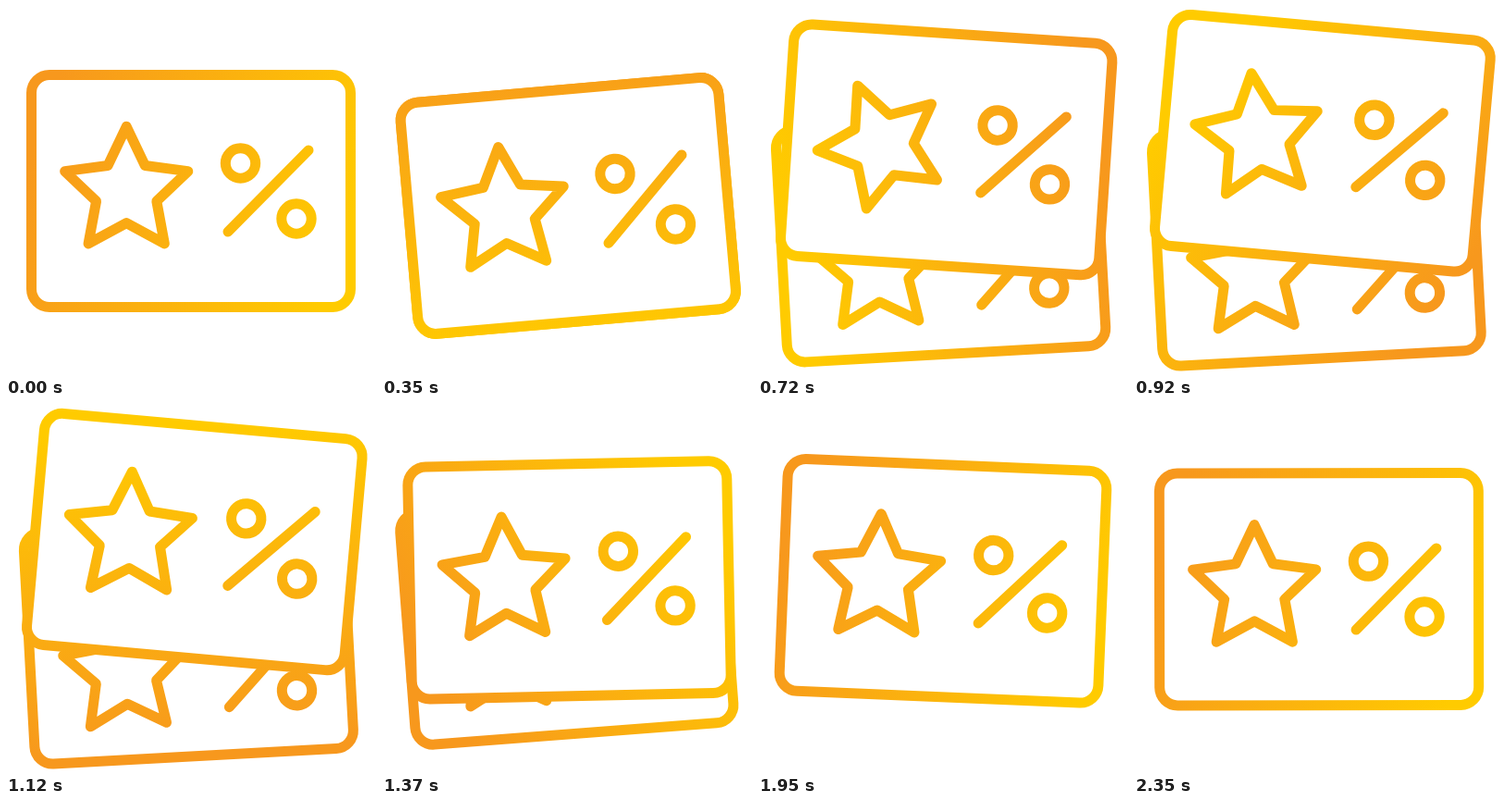
An HTML page with a canvas that plays this animation: 400x400 px, repeating every 2370 ms.

```html
<!DOCTYPE html>
<html lang="en">
<head>
<meta charset="utf-8">
<title>Discount cards</title>
<style>
html, body { margin: 0; width: 100%; height: 100%; overflow: hidden; background: #fff; }
canvas { display: block; width: 100vmin; height: 100vmin; }
</style>
</head>
<body>
<canvas id="stage"></canvas>
<script>
const LOOP = 2370, SIZE = 400, LINE = 11;
const SPLIT = 350, MERGE = 1570;
const canvas = document.getElementById('stage');
const ctx = canvas.getContext('2d');

// Key poses: time, angle, dx, dy
const front = [
  [0, 0, 0, 0], [325, -5.1, 1.3, 16.3], [350, -5, 1.3, 16],
  [520, -0.8, 2, -14], [720, 3.8, 3.7, -44.6], [1035, 5.4, 3.9, -53],
  [1120, 5.1, 3.8, -51], [1570, -5.1, 1.3, 16], [1950, 2.4, 0, -8.7],
  [2175, 0.9, 0, -2.5], [2290, -0.7, 0, 1.2], [2370, 0, 0, 0]
];
const back = [
  [350, -5, 1.3, 16], [520, -4, -1, 35], [720, -3.2, -2.4, 51],
  [1035, -3, -2.7, 56.5], [1120, -3.1, -2.6, 55.5], [1570, -5.1, 1.3, 16]
];
const starSpin = [[350, 0], [720, 46], [1120, 68.6], [1600, 71], [1950, 72]];
const shade = [[0, 20], [350, 85], [720, 168], [1120, 266], [1600, 366], [1950, 377], [2370, 380]];

// Monotone cubic interpolation of column c
function sample(keys, t, c) {
  const last = keys.length - 1;
  if (t <= keys[0][0]) return keys[0][c];
  if (t >= keys[last][0]) return keys[last][c];
  let i = 0;
  while (t > keys[i + 1][0]) i++;
  const slope = k => (keys[k + 1][c] - keys[k][c]) / (keys[k + 1][0] - keys[k][0]);
  const tangent = k => {
    if (k === 0 || k === last) return 0;
    const a = slope(k - 1), b = slope(k);
    return a * b <= 0 ? 0 : 2 * a * b / (a + b);
  };
  const h = keys[i + 1][0] - keys[i][0];
  const u = (t - keys[i][0]) / h, v = 1 - u;
  return keys[i][c] * (1 + 2 * u) * v * v + tangent(i) * h * u * v * v +
    keys[i + 1][c] * u * u * (3 - 2 * u) - tangent(i + 1) * h * u * u * v;
}

const rad = deg => deg * Math.PI / 180;

function outline(build) {
  const path = new Path2D();
  build(path);
  return path;
}

const frame = outline(p => p.roundRect(-172.5, -125.5, 345, 251, 19.5));
const percent = outline(p => {
  p.moveTo(40, 44);
  p.lineTo(127, -44);
  for (const [x, y] of [[53.5, -30], [114, 30]]) {
    p.moveTo(x + 16.2, y);
    p.arc(x, y, 16.2, 0, 2 * Math.PI);
  }
});
const star = outline(p => {
  for (let i = 0; i < 10; i++) {
    const r = i % 2 ? 34.3 : 70, a = rad(i * 36 - 90);
    p.lineTo(r * Math.cos(a), r * Math.sin(a));
  }
  p.closePath();
});

// Strokes a path in card space while the gradient stays fixed to the stage
function ink(path, matrix, paint, fill) {
  const placed = new Path2D();
  placed.addPath(path, matrix);
  if (fill) {
    ctx.fillStyle = '#fff';
    ctx.fill(placed);
  }
  ctx.strokeStyle = paint;
  ctx.stroke(placed);
}

function card(keys, t, paint, drop, spin) {
  const [angle, dx, dy] = [1, 2, 3].map(c => sample(keys, t, c));
  const m = new DOMMatrix().translate(200 + dx, 200 + dy).rotate(angle);
  const inner = m.translate(0, drop);
  ink(frame, m, paint, true);
  ink(star, inner.translate(-69.8, 0.3).rotate(spin), paint);
  ink(percent, inner, paint);
}

function gradient(t) {
  const a = rad(sample(shade, t, 1));
  const x = 176 * Math.cos(a), y = 176 * Math.sin(a);
  const g = ctx.createLinearGradient(200 - x, 200 - y, 200 + x, 200 + y);
  g.addColorStop(0, '#f7981d');
  g.addColorStop(1, '#ffcb00');
  return g;
}

function resize() {
  const side = Math.min(innerWidth, innerHeight) || SIZE;
  canvas.width = canvas.height = Math.round(side * (window.devicePixelRatio || 1));
}

function draw(t) {
  const k = canvas.width / SIZE;
  ctx.setTransform(k, 0, 0, k, 0, 0);
  ctx.fillStyle = '#fff';
  ctx.fillRect(0, 0, SIZE, SIZE);
  ctx.lineWidth = LINE;
  ctx.lineCap = ctx.lineJoin = 'round';
  const paint = gradient(t);
  if (t > SPLIT && t < MERGE) card(back, t, paint, 30.5, 0);
  card(front, t, paint, 0, sample(starSpin, t, 1));
}

const start = performance.now();
function tick() {
  draw((performance.now() - start) % LOOP);
  requestAnimationFrame(tick);
}

addEventListener('resize', resize);
resize();
tick();
</script>
</body>
</html>
```
